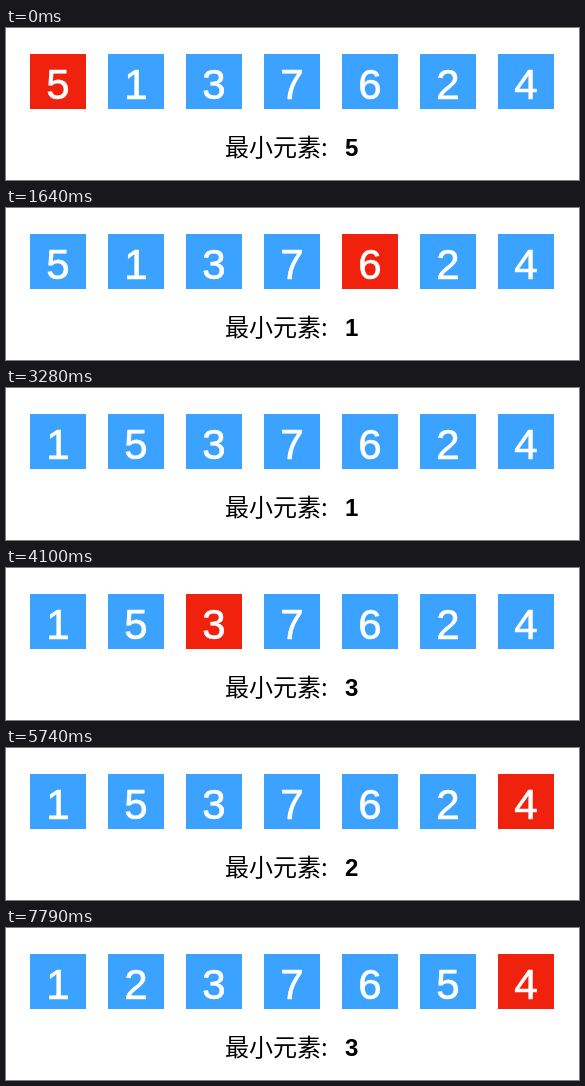
These frames come from a looping animation (573x152 px, 8000 ms). An HTML page:

```html
<!DOCTYPE html>
<html lang="zh-CN">
<meta charset="utf-8">
<style>
html, body { margin: 0; height: 100%; overflow: hidden; background: #fff; }
svg { display: block; }
.num { font: 42px "Liberation Sans", Arial, sans-serif; fill: #fff; stroke: #fff; stroke-width: .7; text-anchor: middle; }
.label { font: 500 24px "Noto Sans CJK SC", "Noto Sans CJK", sans-serif; }
.min { font: bold 24px "Liberation Sans", Arial, sans-serif; }
</style>
<body>
<svg width="573" height="152" viewBox="0 0 573 152">
  <g id="cells"></g>
  <text class="label" x="219" y="128">最小元素:</text>
  <text class="min" id="min" x="339" y="128"></text>
</svg>
<script>
const STEP = 410, LOOP = 8000;
const cells = document.getElementById('cells');
const min = document.getElementById('min');

// Each step: values, highlighted index (-1 for none), smallest value so far.
const steps = [];
function scan(list, from) {
  let best = from;
  for (let i = from; i < list.length; i++) {
    if (list[i] < list[best]) best = i;
    steps.push([list.slice(), i, list[best]]);
  }
  return best;
}
function swap(list, a, b) {
  [list[a], list[b]] = [list[b], list[a]];
}

const list = [5, 1, 3, 7, 6, 2, 4];
let best = scan(list, 0);
steps.push([list.slice(), -1, list[best]]);
swap(list, 0, best);
steps.push([list.slice(), -1, list[0]]);
swap(list, 1, scan(list, 1));
scan(list, 2);

cells.innerHTML = list.map((_, i) => {
  const x = 24 + 78 * i;
  return `<rect x="${x}" y="26" width="56" height="55"/><text class="num" x="${x + 28}" y="71"></text>`;
}).join('');
const rects = cells.querySelectorAll('rect');
const nums = cells.querySelectorAll('text');

let shown = -1;
function draw() {
  const n = Math.floor(performance.now() % LOOP / STEP);
  if (n !== shown) {
    shown = n;
    const [values, active, smallest] = steps[n];
    values.forEach((v, i) => {
      rects[i].setAttribute('fill', i === active ? '#f0210d' : '#3ca2ff');
      nums[i].textContent = v;
    });
    min.textContent = smallest;
  }
  requestAnimationFrame(draw);
}
draw();
</script>
</body>
</html>
```
